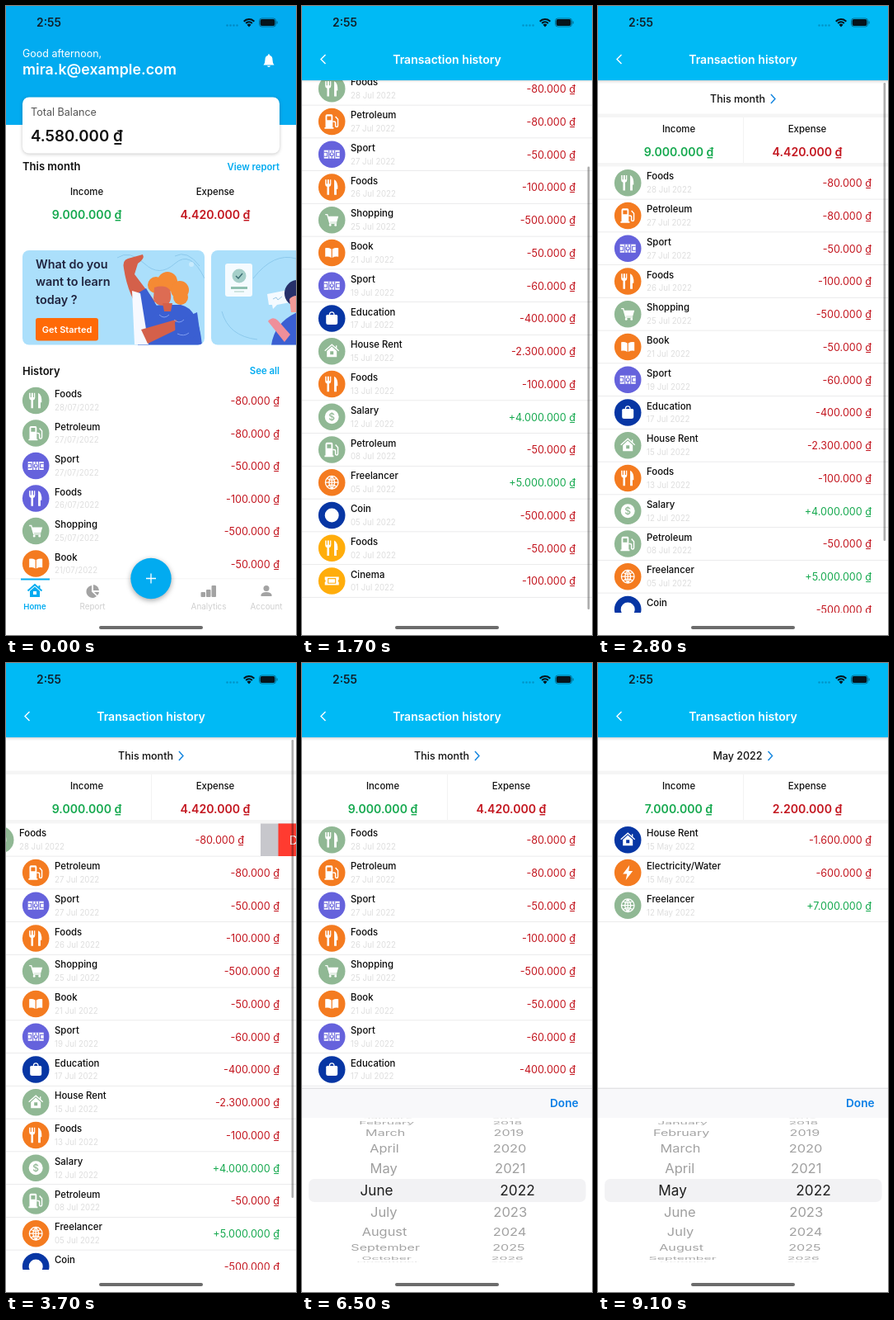
Write an HTML page with a canvas that moves like this. It is 352 by 762 pixels and loops after 9700 ms.

```html
<!DOCTYPE html>
<html lang="en">
<head>
<meta charset="utf-8">
<title>Budget app</title>
<style>
html, body { margin: 0; width: 100%; height: 100%; overflow: hidden; background: #fff; }
canvas { display: block; width: 352px; height: 762px; }
</style>
</head>
<body>
<canvas id="stage"></canvas>
<script>
const W = 352, H = 762, LOOP = 9700;
const canvas = document.getElementById('stage');
const c = canvas.getContext('2d');
const dpr = window.devicePixelRatio || 1;
canvas.width = W * dpr;
canvas.height = H * dpr;

const BLUE = '#02abf0', SKY = '#00baf5', RED = '#c3161f', GREEN = '#16a94f';
const TINT = { g: '#90b894', o: '#f47b20', p: '#6562dc', n: '#0736a4', y: '#ffad0b' };
const MONTHS = ['January', 'February', 'March', 'April', 'May', 'June', 'July',
  'August', 'September', 'October', 'November', 'December'];
const YEARS = Array.from({ length: 16 }, (_, i) => 2014 + i);

// name | tint | day | amount
const parse = (month, text) => text.split(',').map(s => {
  const [name, tint, day, sum] = s.split('|');
  return { name, tint, date: `${day} ${month} 2022`, day, sum };
});
const VIEWS = {
  july: {
    label: 'This month', income: '9.000.000', expense: '4.420.000',
    rows: parse('Jul', 'Foods|g|28|-80.000,Petroleum|o|27|-80.000,Sport|p|27|-50.000,' +
      'Foods|o|26|-100.000,Shopping|g|25|-500.000,Book|o|21|-50.000,Sport|p|19|-60.000,' +
      'Education|n|17|-400.000,House Rent|g|15|-2.300.000,Foods|o|13|-100.000,' +
      'Salary|g|12|+4.000.000,Petroleum|g|08|-50.000,Freelancer|o|05|+5.000.000,' +
      'Coin|n|05|-500.000,Foods|y|02|-50.000,Cinema|y|01|-100.000')
  },
  june: {
    label: 'June 2022', income: '7.000.000', expense: '2.300.000',
    rows: parse('Jun', 'House Rent|g|15|-1.600.000,Electricity/Water|n|15|-700.000,Freelancer|o|12|+7.000.000')
  },
  may: {
    label: 'May 2022', income: '7.000.000', expense: '2.200.000',
    rows: parse('May', 'House Rent|n|15|-1.600.000,Electricity/Water|o|15|-600.000,Freelancer|g|12|+7.000.000')
  }
};

// f: white fill, s: white line, t: line in the tint of the disc, z: scale
const ring = r => `M${-r} 0a${r} ${r} 0 1 0 ${2 * r} 0a${r} ${r} 0 1 0 ${-2 * r} 0z`;
const ROOF = 'M-8.5-.5L0-8L8.5-.5M5.5-7v3.5';
const WALLS = 'M-6-.2L0-5.6L6-.2V7H-6zM-2 0V4H2V0z';
const ICONS = {
  'Foods': { z: 1.15, f: 'M-7-8v5q0 2 2 2.6V8h2.2V-.4q2-.6 2-2.6v-5h-1.1v4.5h-1v-4.5h-1.8v4.5h-1v-4.5zM2.5-8Q6.6-6 6.2 2H5v6H2.5z' },
  'Petroleum': { z: 1.1, f: 'M-8 8V6.5h1V-6q0-1.8 1.8-1.8h4.7Q1-7.8 1-6V6.5h1V8zM-5.3-5.8v4.3h4.6v-4.3z', s: 'M1 0h1.5Q4 0 4 1.5V4.5Q4 6 5.3 6T6.7 4.5V-2.5L4-5.5' },
  'Sport': { f: 'M-9.5-5h19v10h-19z', t: 'M0-5v2.3M0 2.7V5M-9.5-2.5h4v5h-4M9.5-2.5h-4v5h4M-3.5-5V5M3.5-5V5' + ring(2) },
  'Shopping': { f: 'M-5-4.5H8L6 2.5H-3zM-3.5 6a1.5 1.5 0 1 0 3 0a1.5 1.5 0 1 0-3 0zM3 6a1.5 1.5 0 1 0 3 0a1.5 1.5 0 1 0-3 0z', s: 'M-8-6.5h2.5L-2.5 3.8H6' },
  'Book': { f: 'M-.6-4.5Q-4-6.5-8-5.7V4.8Q-4 4-.6 6zM.6-4.5Q4-6.5 8-5.7V4.8Q4 4 .6 6z' },
  'Education': { f: 'M-5.5-4.5h11Q7-4.5 7-3V5Q7 7.5 4.5 7.5h-9Q-7 7.5-7 5v-8q0-1.5 1.5-1.5z', s: 'M-2.8-4.5Q-2.8-7.5 0-7.5T2.8-4.5' },
  'House Rent': { f: WALLS, s: ROOF },
  'Salary': { f: ring(8.5), sign: '$' },
  'Freelancer': { s: ring(7.8) + 'M-7.8 0H7.8M0-7.8V7.8M-6-5Q0-1 6-5M-6 5Q0 1 6 5M0-7.8Q-7 0 0 7.8Q7 0 0-7.8' },
  'Coin': { f: ring(8.5) },
  'Cinema': { f: 'M-8.5-5h17v3.5q-2 1.5 0 3V5h-17V1.5q2-1.5 0-3z', t: 'M-4.5-2.8h9v5.6h-9z' },
  'Electricity/Water': { f: 'M2-9L-6 1.5H-1L-2.5 9 6-2H1z' }
};

const clamp = (v, a = 0, b = 1) => Math.max(a, Math.min(b, v));

// Smooth interpolation through [time, value] pairs.
function track(t, pts) {
  if (t <= pts[0][0]) return pts[0][1];
  for (let i = 1; i < pts.length; i++) {
    const [a, va] = pts[i - 1], [b, vb] = pts[i];
    if (t < b) {
      const k = (t - a) / (b - a);
      return va + (vb - va) * k * k * (3 - 2 * k);
    }
  }
  return pts[pts.length - 1][1];
}

function font(size, weight) {
  c.font = `${weight} ${size}px Inter, "Noto Sans", sans-serif`;
}
// y is the middle of the capitals
function text(s, x, y, size, weight, color, align = 'left') {
  font(size, weight);
  c.textAlign = align;
  c.fillStyle = color;
  c.fillText(s, x, y + size * 0.36);
}
function rect(x, y, w, h, color) {
  c.fillStyle = color;
  c.fillRect(x, y, w, h);
}
function box(x, y, w, h, r, color) {
  c.beginPath();
  c.roundRect(x, y, w, h, r);
  c.fillStyle = color;
  c.fill();
}
function dot(x, y, r, color) {
  c.beginPath();
  c.arc(x, y, r, 0, 7);
  c.fillStyle = color;
  c.fill();
}
function shape(d, fill, line, width = 1.3) {
  const p = new Path2D(d);
  if (fill) { c.fillStyle = fill; c.fill(p, 'evenodd'); }
  if (line) { c.strokeStyle = line; c.lineWidth = width; c.stroke(p); }
}
function at(x, y, draw) {
  c.save();
  c.translate(x, y);
  draw();
  c.restore();
}
function clip(x, y, w, h, draw, r = 0) {
  c.save();
  c.beginPath();
  c.roundRect(x, y, w, h, r);
  c.clip();
  draw();
  c.restore();
}
function shadow(blur, y, alpha, draw) {
  c.save();
  c.shadowColor = `rgba(0,0,0,${alpha})`;
  c.shadowBlur = blur * dpr;
  c.shadowOffsetY = y * dpr;
  draw();
  c.restore();
}

function entry(row, y, tint, date) {
  dot(36.2, y, 16.3, TINT[tint]);
  at(36.2, y, () => {
    const { f, s, t, sign, z = 1 } = ICONS[row.name];
    c.scale(z, z);
    if (f) shape(f, '#fff');
    if (s) shape(s, null, '#fff');
    if (t) shape(t, null, TINT[tint], 1.1);
    if (sign) text(sign, 0, 0, 12, 500, TINT[tint], 'center');
  });
  text(row.name, 59, y - 8, 11.4, 500, '#0c0c0c');
  text(date, 59, y + 8.5, 9.7, 400, '#dedede');
  text(row.sum + ' ₫', 332, y + 0.5, 12.6, 400, row.sum[0] === '+' ? GREEN : RED, 'right');
}

function totals(view, y) {
  text('Income', 98, y, 11.4, 500, '#111', 'center');
  text('Expense', 254, y, 11.4, 500, '#111', 'center');
  text(view.income + ' ₫', 98, y + 28, 14.1, 600, GREEN, 'center');
  text(view.expense + ' ₫', 254, y + 28, 14.1, 600, RED, 'center');
}

function banners() {
  const back = '#abdffb', line = '#8cc9ec', skin = '#d4604a', blue = '#3a5fd2';
  clip(20, 296, 221, 114.5, () => {
    rect(20, 296, 221, 115, back);
    shape('M135 305Q150 295 168 312T205 312T241 330M205 303q15-8 30 12', null, line, 1);
    shape('M160 411Q160 362 190 362H212Q234 366 238 411z', blue);
    shape('M143 318Q141 308 148 306L166 301Q169 306 160 312L156 325L181 358L168 377Q148 352 143 318z', skin);
    shape('M158 349L170 342L186 368L168 386z', blue);
    dot(182, 338, 10, '#f58a34');
    dot(196, 334, 12, '#f58a34');
    dot(211, 344, 11, '#f58a34');
    dot(212, 353, 9, '#f58a34');
    shape('M180 341Q193 337 199 344Q203 358 194 363Q181 364 179 354z', '#dd6c53');
    shape('M190 360h12l-2 10h-8z', skin);
    shape('M153 345L163 348L173 410H156z', '#f7f9ff');
    shape('M164 392L206 380Q214 386 205 393L172 409z', skin);
    shape('M205 383L232 371L236 400L206 404z', blue);
    shape('M186 374q6 6 12 0m6 6q6 6 12 0m-8 17q8 4 14-1', null, '#7f9cf0', 1);
    dot(225, 313, 3, '#c8ebfd');
    ['What do you', 'want to learn', 'today ?'].forEach((s, i) =>
      text(s, 36, 313 + i * 21.3, 14.4, 600, '#20243f'));
    box(36, 378, 76, 27.5, 3, '#ff6a07');
    text('Get Started', 74, 392, 11, 600, '#fff', 'center');
  }, 8);
  clip(249, 296, 120, 114.5, () => {
    rect(249, 296, 120, 115, back);
    shape('M300 330Q325 298 352 306M305 404Q270 400 262 370', null, line, 1);
    box(266, 312, 33, 40, 3, '#f5fbff');
    dot(283, 327, 8.5, '#a5cfc9');
    shape('M279 327l3 3 5-6', null, '#396b70', 1.4);
    rect(273, 340, 20, 3, '#8fc0b0');
    rect(277, 345, 12, 2, '#cfe4e0');
    shape('M317 349L342 344L345 359L329 362L324 367L323 362L319 362z', '#f4faff');
    shape('M324 355l4-2 2 3 5-4', null, '#9cc7e4', 1);
    dot(354, 348, 16, '#26306a');
    shape('M344 355Q350 349 356 352V371H346z', '#f19a96');
    shape('M322 411Q326 382 356 370V411z', blue);
    shape('M318 382Q324 375 330 381L345 398L338 407z', '#ef8f9a');
  }, 8);
}

function tabs() {
  rect(0, 694, W, 68, '#fff');
  rect(0, 693.5, W, 0.7, '#f0f0f0');
  rect(18, 693.5, 35, 2, BLUE);
  const grey = '#a3a3a3', pale = '#cfcfcf';
  at(35, 709, () => shape(WALLS, BLUE, null));
  at(35, 709, () => shape(ROOF, null, BLUE, 1.8));
  at(105, 709, () => {
    shape('M-1-7A7.5 7.5 0 1 0 5 6L-1 .5z', grey);
    shape('M1-8A7.5 7.5 0 0 1 8-1H1zM2 1H8A7 7 0 0 1 6 5z', grey);
  });
  at(246, 709, () => [[-9.5, 6], [-3, 9], [3.5, 14]].forEach(([x, h]) => box(x, 7 - h, 5.5, h, 1, grey)));
  at(316, 709, () => {
    dot(0, -3.5, 3.5, grey);
    shape('M-6.5 6V4Q-5 1 0 1T6.5 4V6z', grey);
  });
  text('Home', 35, 727.5, 9.6, 600, BLUE, 'center');
  text('Report', 105, 727.5, 9.9, 400, pale, 'center');
  text('Analytics', 246, 727.5, 9.9, 400, pale, 'center');
  text('Account', 316, 727.5, 9.9, 400, pale, 'center');
  shadow(6, 2, 0.35, () => dot(176, 693.5, 24.7, BLUE));
  shape('M170 693.5h12M176 687.5v12', null, '#fff', 1.3);
}

function home() {
  rect(0, 0, W, H, '#fff');
  rect(0, 0, W, 144, BLUE);
  text('Good afternoon,', 20, 57, 12.5, 400, '#fff');
  text('mira.k@example.com', 20, 76.5, 17.8, 600, '#fff');
  at(319, 66, () => shape('M-6.5 5.5Q-4.5 3.5-4.5-1Q-4.5-5.5-1-6.3V-7.5H1V-6.3Q4.5-5.5 4.5-1Q4.5 3.5 6.5 5.5zM-2 6.5H2Q1.5 8 0 8T-2 6.5z', '#fff'));
  shadow(4, 1, 0.22, () => box(20, 110.5, 312, 68, 8, '#fff'));
  text('Total Balance', 30, 128, 12.6, 400, '#555');
  text('4.580.000 ₫', 30, 157, 18.7, 600, '#111');
  text('This month', 20, 194.5, 13, 600, '#111');
  text('View report', 332, 194.5, 11.3, 600, BLUE, 'right');
  totals(VIEWS.july, 225);
  banners();
  text('History', 20, 442, 13, 600, '#111');
  text('See all', 332, 442, 11.4, 600, BLUE, 'right');
  VIEWS.july.rows.slice(0, 6).forEach((row, i) =>
    entry(row, 478 + i * 39.5, 'ggppgo'[i], row.day + '/07/2022'));
  tabs();
}

function swipeButtons(open) {
  [['Edit', '#c7c7cc', W - open], ['Delete', '#ff3b30', W - open / 2]].forEach(([s, color, x]) => {
    rect(x, 194.5, 70, 39.5, color);
    text(s, x + 35, 214.5, 14.2, 400, '#fff', 'center');
  });
}

function list(view, open) {
  rect(0, 90, W, 3.5, '#f6f6f6');
  font(12.5, 500);
  const w = c.measureText(view.label).width, x = 176 - (w + 13) / 2;
  text(view.label, x, 112, 12.5, 500, '#111');
  shape(`M${x + w + 7} 107l5 5.5-5 5.5`, null, '#1687e0', 1.5);
  rect(0, 130.5, W, 4.5, '#f5f5f5');
  rect(176, 135, 0.8, 55, '#f0f0f0');
  totals(view, 148.5);
  rect(0, 190, W, 4.5, '#f5f5f5');
  view.rows.forEach((row, i) => {
    const y = 214.2 + i * 39.75;
    if (i === 0 && open > 0) swipeButtons(open);
    at(i ? 0 : -open, 0, () => entry(row, y, row.tint, row.date));
    rect(0, y + 19.5, i ? W : W - open, 0.8, '#e6e6e8');
  });
}

function history(t) {
  const view = t < 6750 ? VIEWS.july : t < 7850 ? VIEWS.june : VIEWS.may;
  const scroll = track(t, [[1340, 0], [1680, 114], [1740, 114], [1900, 95.5], [1960, 95.5], [2190, -10], [2220, -10], [2500, 0]]);
  const open = track(t, [[3360, 0], [3600, 18], [3700, 43], [3950, 140], [4150, 140], [4460, 0]]);
  rect(0, 0, W, H, '#fff');
  clip(0, 90, W, 645, () => at(0, -scroll, () => list(view, open)));

  const fade = t < 1390 ? 0 : clamp((5600 - t) / 200);
  if (fade) {
    const over = Math.max(0, -scroll, scroll - 95.5);
    const len = 555 - over;
    const y = scroll > 95.5 ? 731 - len : 93 + 83 * clamp(scroll / 95.5);
    box(346.5, y, 2.7, len, 1.3, `rgba(0,0,0,${0.32 * fade})`);
  }
  shadow(2, 0.5, 0.16, () => rect(0, 0, W, 90, SKY));
  shape('M28.5 59l-5.5 5.5 5.5 5.5', null, '#fff', 1.4);
  text('Transaction history', 176, 64.5, 14.1, 600, '#fff', 'center');
  if (t > 5340) picker(t);
}

function wheel(items, pos, side) {
  items.forEach((item, i) => {
    const d = i - pos, a = d * 0.309;
    if (Math.abs(a) > 1.56) return;
    const lens = clamp(1 - Math.abs(d) * 1.6);
    const cos = Math.cos(a);
    const near = 0.93 + 0.07 * cos;
    at(176 + side * (77 + 8.5 * lens) * near, 639 + 87.2 * Math.sin(a), () => {
      c.scale(near, cos);
      const ink = Math.round(158 - 128 * lens + 14 * (1 - cos));
      text(String(item), 0, 0, 16.6 + 0.6 * lens, 400, `rgb(${ink},${ink},${ink})`, 'center');
    });
  });
}

function picker(t) {
  const k = clamp((t - 5340) / 250);
  const month = track(t, [[6240, 6], [6490, 5], [7430, 5], [7610, 4]]);
  at(0, 247 * (1 - k) ** 2, () => {
    rect(0, 515, W, 247, '#fff');
    rect(0, 515, W, 36, '#f8f8fa');
    rect(0, 514.7, W, 1, '#d9d9dd');
    text('Done', 335.5, 533.5, 13.6, 600, '#0a7ee6', 'right');
    box(8, 625, 336.5, 28, 7, '#f2f2f4');
    clip(0, 551, W, 179, () => {
      wheel(MONTHS, month, -1);
      wheel(YEARS, 8, 1);
    });
  });
}

function system() {
  const ink = '#06141c';
  text('2:55', 52, 20.2, 13.8, 600, '#10202a', 'center');
  for (let i = 0; i < 4; i++) dot(268.5 + i * 4, 23.5, 1.2, 'rgba(0,50,80,.28)');
  at(295, 24.5, () => {
    c.strokeStyle = ink;
    c.lineWidth = 2;
    [8.5, 5.2].forEach(r => {
      c.beginPath();
      c.arc(0, 0, r, -2.4, -0.74);
      c.stroke();
    });
    shape('M0 1L-2.5-1.8Q0-4 2.5-1.8z', ink);
  });
  c.beginPath();
  c.roundRect(307.5, 15, 20, 10, 3);
  c.strokeStyle = 'rgba(0,20,30,.45)';
  c.lineWidth = 1;
  c.stroke();
  box(308.6, 16, 17.8, 8, 2, ink);
  rect(328.5, 18.5, 1.2, 3, 'rgba(0,20,30,.45)');
  box(113, 751, 126, 4, 2, '#6c6c6c');
}

function draw(t) {
  c.setTransform(dpr, 0, 0, dpr, 0, 0);
  // Critically damped spring for the screen rising from below
  const s = Math.max(0, t - 420) * 0.0168;
  const lift = H * (1 + s) * Math.exp(-s);
  if (lift > 0.3) home();
  if (s > 0) at(0, lift > 0.3 ? lift : 0, () => history(t));
  system();
}

function tick() {
  draw(performance.now() % LOOP);
  requestAnimationFrame(tick);
}
tick();
</script>
</body>
</html>
```
